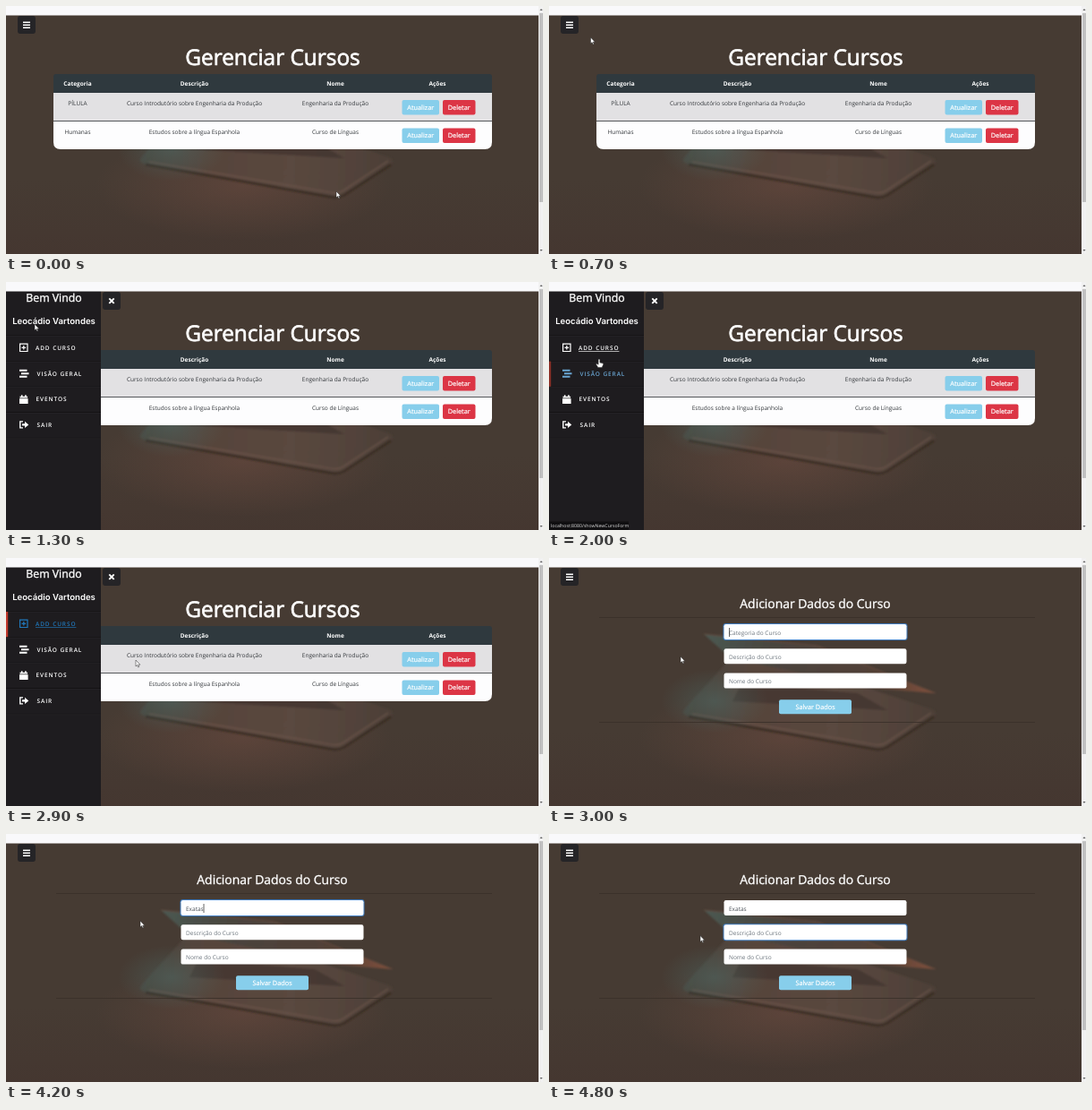
These frames come from a looping animation (600x277 px, 5 s). An HTML page:

```html
<!DOCTYPE html>
<html lang="pt">
<head>
<meta charset="utf-8">
<title>Gerenciar Cursos</title>
<style>
  html, body { margin: 0; width: 100%; height: 100%; overflow: hidden; background: #463b33; }
  svg { display: block; width: 600px; height: 277px; }
  text { font: 6.5px "Open Sans", "Noto Sans", sans-serif; text-rendering: geometricPrecision; white-space: pre; }
  .mid { text-anchor: middle; }
  .title, .subtitle, .hello, .btn { fill: #fff; stroke: #fff; }
  .title { font-size: 24.4px; stroke-width: .7px; }
  .subtitle { font-size: 13.9px; stroke-width: .35px; }
  .hello { font-size: 12.3px; stroke-width: .35px; }
  .btn { font-size: 7.3px; stroke-width: .2px; }
  .head { font-weight: 700; fill: #fff; }
  .cell { fill: #33373b; }
  .user { font: 600 9.6px Inter, sans-serif; fill: #fff; }
  .item text { font-weight: 600; letter-spacing: .9px; }
  .status { font-size: 5.2px; fill: #dcdcdc; }
</style>
</head>
<body>
<svg viewBox="0 0 600 277">
  <defs>
    <linearGradient id="deck" x1="150" y1="170" x2="430" y2="185" gradientUnits="userSpaceOnUse">
      <stop offset="0" stop-color="#48463f"/>
      <stop offset=".3" stop-color="#57443b"/>
      <stop offset=".6" stop-color="#5a483f"/>
      <stop offset="1" stop-color="#4d4038"/>
    </linearGradient>
    <linearGradient id="lid" x1="173" y1="90" x2="430" y2="150" gradientUnits="userSpaceOnUse">
      <stop offset="0" stop-color="#4b5852"/>
      <stop offset=".3" stop-color="#4a443d"/>
      <stop offset=".75" stop-color="#523f36"/>
      <stop offset="1" stop-color="#80503c"/>
    </linearGradient>
    <linearGradient id="floor" x1="0" y1="0" x2="0" y2="1">
      <stop offset="0" stop-color="#44352f" stop-opacity="0"/>
      <stop offset="1" stop-color="#44352f" stop-opacity=".7"/>
    </linearGradient>
    <radialGradient id="red">
      <stop offset="0" stop-color="#7c5145" stop-opacity=".4"/>
      <stop offset="1" stop-color="#7c5145" stop-opacity="0"/>
    </radialGradient>
    <radialGradient id="teal">
      <stop offset="0" stop-color="#4f7370" stop-opacity=".4"/>
      <stop offset="1" stop-color="#4f7370" stop-opacity="0"/>
    </radialGradient>
    <filter id="soft"><feGaussianBlur stdDeviation=".8"/></filter>
  </defs>

  <rect width="600" height="277" fill="#463b33"/>
  <rect y="195" width="595" height="82" fill="url(#floor)"/>
  <ellipse cx="265" cy="200" rx="165" ry="62" fill="url(#red)"/>
  <g filter="url(#soft)">
    <path d="M203 112 L152 168 Q146 174 156 177 L362 213 Q371 215 378 211 L430 177 Q435 173 428 169 L340 140Z" fill="url(#deck)"/>
    <path d="M156 177 L362 213 Q371 215 378 211 L430 177" fill="none" stroke="#33281f" stroke-width="2"/>
    <path d="M160 174 L362 208 Q371 210 377 206 L427 173" fill="none" stroke="#775d52" stroke-width="1.2" opacity=".7"/>
    <path d="M215 140 L345 151 L378 170 L205 160Z" fill="#3b302b" opacity=".6"/>
    <path d="M173 85 L300 98 L432 151 L366 146 L203 112Z" fill="url(#lid)"/>
    <path d="M173 85 L300 98 L432 151" fill="none" stroke="#6c4d40" stroke-width=".8"/>
  </g>
  <ellipse cx="185" cy="160" rx="60" ry="36" fill="url(#teal)"/>

  <g id="list"></g>
  <g id="form"></g>
  <g id="side"></g>

  <g id="toggle">
    <rect y="11" width="20" height="20" rx="3" fill="#252427"/>
    <path id="bars" d="M6 18.2h8M6 21.2h8M6 24.2h8" stroke="#fff" stroke-width="1.5"/>
    <path id="cross" d="M7.3 18.4l5.4 5.4m0-5.4l-5.4 5.4" stroke="#fff" stroke-width="1.9"/>
  </g>

  <rect width="600" height="10.5" fill="#f9f9fb"/>
  <rect x="595" width="5" height="277" fill="#f1f1f1"/>
  <rect x="596" y="8" width="4" height="211" fill="#c1c1c1"/>
  <path d="M596.4 5l1.6-2 1.6 2zM596.4 272l1.6 2 1.6-2z" fill="#666"/>

  <g id="status">
    <rect y="267.5" width="89" height="9.5" fill="#100f11"/>
    <text class="status" x="2" y="274.3">localhost:8080/showNewCursoForm</text>
  </g>
  <path id="arrow" d="M0 0v7l1.6-1.4 1.1 2.4 1.1-.5-1.1-2.3h2.2z" fill="#fff" stroke="#222" stroke-width=".5"/>
  <path id="hand" d="M-.9 .6Q0-.6.9.6V4l3.2.8q.8.3.7 1.2L3.2 9.4H-1.2L-3.4 6q-.2-1 .8-.8l1.7 1z" fill="#fff" stroke="#222" stroke-width=".5"/>
</svg>

<script>
const $ = id => document.getElementById(id);
const text = (cls, x, y, s) => `<text class="${cls}" x="${x}" y="${y}">${s}</text>`;
const box = (x, y, w, h, fill, rx = 0, more = '') =>
  `<rect x="${x}" y="${y}" width="${w}" height="${h}" rx="${rx}" fill="${fill}" ${more}/>`;
const button = (x, y, w, h, fill, label) =>
  box(x, y, w, h, fill, 2) + text('btn mid', x + w / 2, y + h / 2 + 2.6, label);

// Course list
const columns = [80, 210.5, 368, 482];
const cells = (cls, y, words) => words.map((s, i) => text(cls + ' mid', columns[i], y, s)).join('');
const actions = y => button(442.5, y, 41.5, 16.5, '#87ceeb', 'Atualizar') + button(488, y, 36.5, 16.5, '#dc3545', 'Deletar');
$('list').innerHTML =
  text('title mid', 298, 65.5, 'Gerenciar Cursos') +
  '<path d="M53 97V79q0-3 3-3H540q3 0 3 3V97z" fill="#2f393e"/>' +
  box(53, 97, 490, 31.5, '#e2e1e3') +
  '<path d="M53 128.5H543V152q0 8-8 8H61q-8 0-8-8z" fill="#fdfdfe"/>' +
  box(53, 128, 490, 1, '#55585b') +
  cells('head', 89, ['Categoria', 'Descrição', 'Nome', 'Ações']) +
  cells('cell', 111, ['PÍLULA', 'Curso Introdutório sobre Engenharia da Produção', 'Engenharia da Produção']) +
  cells('cell', 142.5, ['Humanas', 'Estudos sobre a língua Espanhola', 'Curso de Línguas']) +
  actions(105) + actions(136.5);

// Course form
const hints = ['Categoria do Curso', 'Descrição do Curso', 'Nome do Curso'];
const fieldY = i => 74 + i * 27.3;
$('form').innerHTML =
  text('subtitle mid', 297.5, 55.5, 'Adicionar Dados do Curso') +
  box(56, 66, 487, .9, '#3a302a') + box(56, 183, 487, .9, '#3a302a') +
  box(195.2, 0, 204.6, 17.5, 'none', 2.5, 'id="ring" stroke="#3f7cc0" stroke-width="1.4"') +
  hints.map((s, i) => box(195.5, fieldY(i), 204, 17, '#fff', 2.2) +
    `<text id="field${i}" x="201" y="${fieldY(i) + 11.5}" fill="#6c757d">${s}</text>`).join('') +
  box(201, 78, .7, 10, '#222', 0, 'id="caret"') +
  button(257, 158.3, 81, 16, '#87ceeb', 'Salvar Dados');

// Side menu
const items = [
  ['ADD CURSO', 33, '<path d="M15.6 69.1h8.4v8.4h-8.4zM19.8 71v4.6M17.5 73.3h4.6" fill="none" stroke-width="1.2"/>'],
  ['VISÃO GERAL', 34.5, '<path d="M15 98.8h8.5M17 102.3h8.5M15 105.8h8.5" stroke-width="2"/>'],
  ['EVENTOS', 33.5, '<path d="M15.5 128.6h8.6M17.7 126.2v2M21.9 126.2v2" stroke-width="1.6"/><path d="M15 130.2h9.6v5.8h-9.6z" stroke="none"/>'],
  ['SAIR', 34.5, '<path d="M19 155.9h-3.2v7H19" fill="none" stroke-width="1.4"/><path d="M18 158.2h3v-2.4l4.3 3.6-4.3 3.6v-2.4h-3z" stroke="none"/>']
];
$('side').innerHTML =
  box(0, 10, 106, 267, '#1e1c1f') +
  text('hello mid', 53.5, 21.8, 'Bem Vindo') + text('user mid', 53.5, 47, 'Leocádio Vartondes') +
  [0, 1, 2, 3, 4].map(i => box(0, 59.5 + i * 28.6, 106, .7, '#100f11') + box(0, 60.2 + i * 28.6, 106, .5, '#2b292c')).join('') +
  items.map(([s, x, icon], i) =>
    box(0, 60 + i * 28.6, 2.2, 28.2, '#c0392b', 0, `id="mark${i}"`) +
    `<g class="item" id="item${i}">${icon}${text('', x, 76.2 + i * 28.6, s)}</g>`).join('');

// Pointer path: time, x, y
const path = [
  [0, 369, 207], [600, 68, 48], [800, 25, 22], [1000, 25, 22], [1100, 31, 23], [1300, 32, 47],
  [1500, 40, 76], [1700, 52, 101], [1900, 56, 97], [2000, 56, 86], [2200, 57, 77], [2600, 57, 77],
  [2900, 145, 114], [3100, 149, 106], [3500, 150, 97], [4300, 150, 97], [4800, 169, 113.5], [5000, 169, 113.5]
];
const clamp = (v, a = 0, b = 1) => Math.min(b, Math.max(a, v));
const ramp = (t, from, to) => clamp((t - from) / (to - from));
const show = (id, on) => $(id).style.display = on ? '' : 'none';

function pointer(t) {
  const i = path.findIndex(p => p[0] > t);
  const [t0, x0, y0] = path[i - 1], [t1, x1, y1] = path[i];
  const k = (t - t0) / (t1 - t0);
  return [x0 + (x1 - x0) * k, y0 + (y1 - y0) * k];
}

function paintItem(i, glow, underline) {
  const rgb = [[255, 32], [255, 121], [255, 189]].map(([a, b]) => Math.round(a + (b - a) * glow));
  const style = $('item' + i).style;
  style.fill = style.stroke = `rgb(${rgb})`;
  const label = $('item' + i).lastChild;
  label.style.stroke = 'none';
  label.style.textDecoration = underline ? 'underline' : 'none';
  $('mark' + i).style.opacity = glow;
}

function draw(t) {
  const onForm = t >= 3000;
  show('list', !onForm);
  show('form', onForm);

  const open = onForm ? 0 : ramp(t, 945, 1250);
  show('side', open > 0);
  $('side').setAttribute('transform', `translate(${106 * (open - 1)})`);
  $('toggle').setAttribute('transform', `translate(${13 + 95 * open})`);
  show('bars', !open);
  $('cross').style.opacity = open;

  const overAdd = t >= 1400 && t < 1600 || t >= 2000;
  paintItem(0, ramp(t, 2000, 2300), overAdd);
  paintItem(1, ramp(t, 1500, 1750) * (1 - ramp(t, 1900, 2200)), t >= 1600 && t < 2000);
  paintItem(2, 0);
  paintItem(3, 0);
  show('status', t >= 1600 && t < 2700);

  // Typing, then focus on the next field
  const typed = 'Exatas'.slice(0, clamp(Math.floor((t - 3600) / 100), 0, 6));
  const focus = t >= 4300 ? 1 : 0;
  const field = $('field0');
  field.textContent = typed || hints[0];
  field.style.fill = typed ? '#495057' : '#6c757d';
  $('ring').setAttribute('y', fieldY(focus) - .25);
  const typedWidth = onForm && typed && !focus ? field.getComputedTextLength() : 0;
  $('caret').setAttribute('x', 201 + typedWidth);
  $('caret').setAttribute('y', fieldY(focus) + 4);
  show('caret', t < 4800);

  const [x, y] = pointer(t);
  const link = t >= 1400 && t < 2700;
  show('hand', link);
  show('arrow', !link);
  $(link ? 'hand' : 'arrow').setAttribute('transform', `translate(${x} ${y})`);
}

const start = performance.now();
function tick() {
  const t = (performance.now() - start) % 5000;
  draw(Math.floor(t / 100) * 100);
  requestAnimationFrame(tick);
}
tick();
</script>
</body>
</html>
```
